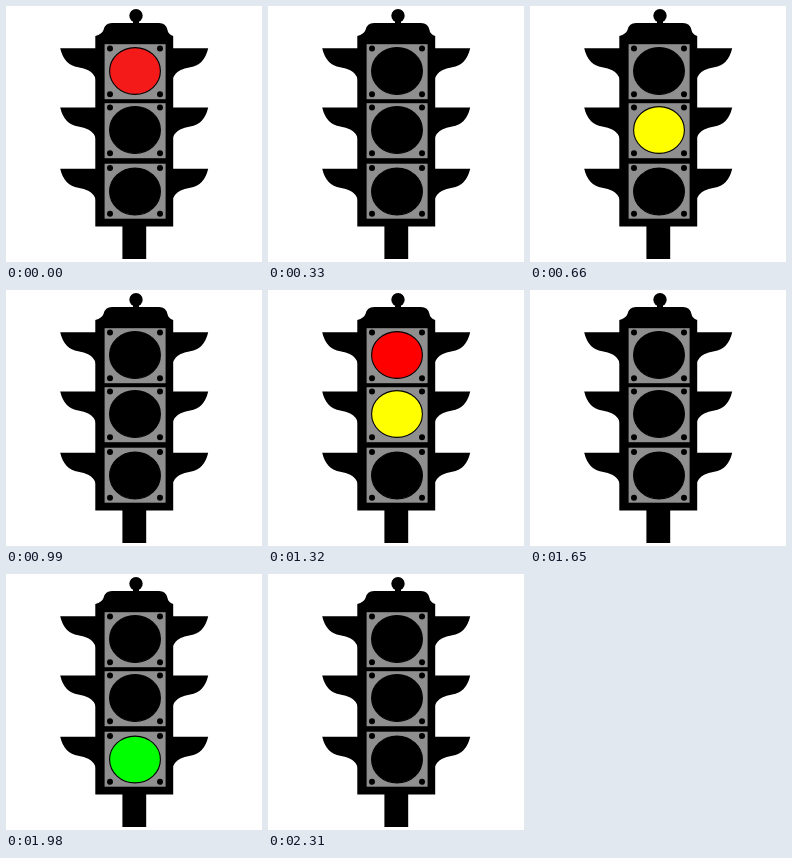
Animation, 256 px wide and 256 px high, one loop 2640 ms. Source, as an HTML page:

```html
<!DOCTYPE html>
<html lang="en">
<head>
<meta charset="utf-8">
<title>Traffic light</title>
<style>
html, body { margin: 0; width: 100%; height: 100%; overflow: hidden; background: #fff; }
svg { display: block; width: 100vw; height: 100vh; }
</style>
</head>
<body>
<svg id="stage" viewBox="0 0 256 256">
  <circle cx="130" cy="9.8" r="6.7"/>
  <path d="M127 13H133V19H127Z"/>
  <path d="M89.3 220.6V30Q96 28 97.5 24Q99 17 106 17H153Q160 17 161.5 24Q162 28 167.2 30V220.6Z"/>
  <path d="M116.4 220H140.2V253H116.4Z"/>
</svg>
<script>
const stage = document.getElementById('stage');
const STEP = 330;
const RED = '#f41a1a', PURE_RED = '#ff0000', YELLOW = '#ffff00', GREEN = '#00ff00';

// One entry per step: lamp colours from top to bottom.
const phases = [
  [RED], [],
  [, YELLOW], [],
  [PURE_RED, YELLOW], [],
  [, , GREEN], []
];

const PANEL_HEIGHT = 55;
const sections = [
  { visor: 42.2, top: 38.2, lamp: 65 },
  { visor: 101.6, top: 97.2, lamp: 124 },
  { visor: 162.8, top: 157.7, lamp: 185.5 }
];

function add(tag, attributes) {
  const node = document.createElementNS('http://www.w3.org/2000/svg', tag);
  for (const [key, value] of Object.entries(attributes)) node.setAttribute(key, value);
  return stage.appendChild(node);
}

function addSection({ visor, top, lamp }) {
  const wing = 'M0 0H36V32Q34 25 28 22Q24 20 18 19Q4 17 0 0Z';
  add('path', { d: wing, transform: `translate(54.2 ${visor})` });
  add('path', { d: wing, transform: `translate(202.2 ${visor}) scale(-1 1)` });
  add('rect', { x: 98.6, y: top, width: 61, height: PANEL_HEIGHT, fill: '#8f8f8f' });
  for (const x of [104, 154])
    for (const y of [top + 4.2, top + PANEL_HEIGHT - 5])
      add('circle', { cx: x, cy: y, r: 3 });
  return add('ellipse', { cx: 129, cy: lamp, rx: 25.4, ry: 23.4, stroke: '#000', 'stroke-width': 1.1 });
}

const lamps = sections.map(addSection);

function render(time) {
  const phase = phases[Math.floor(time / STEP) % phases.length];
  lamps.forEach((lamp, i) => lamp.setAttribute('fill', phase[i] || '#000'));
}

const start = performance.now();
function tick() {
  render(performance.now() - start);
  requestAnimationFrame(tick);
}
tick();
</script>
</body>
</html>
```
